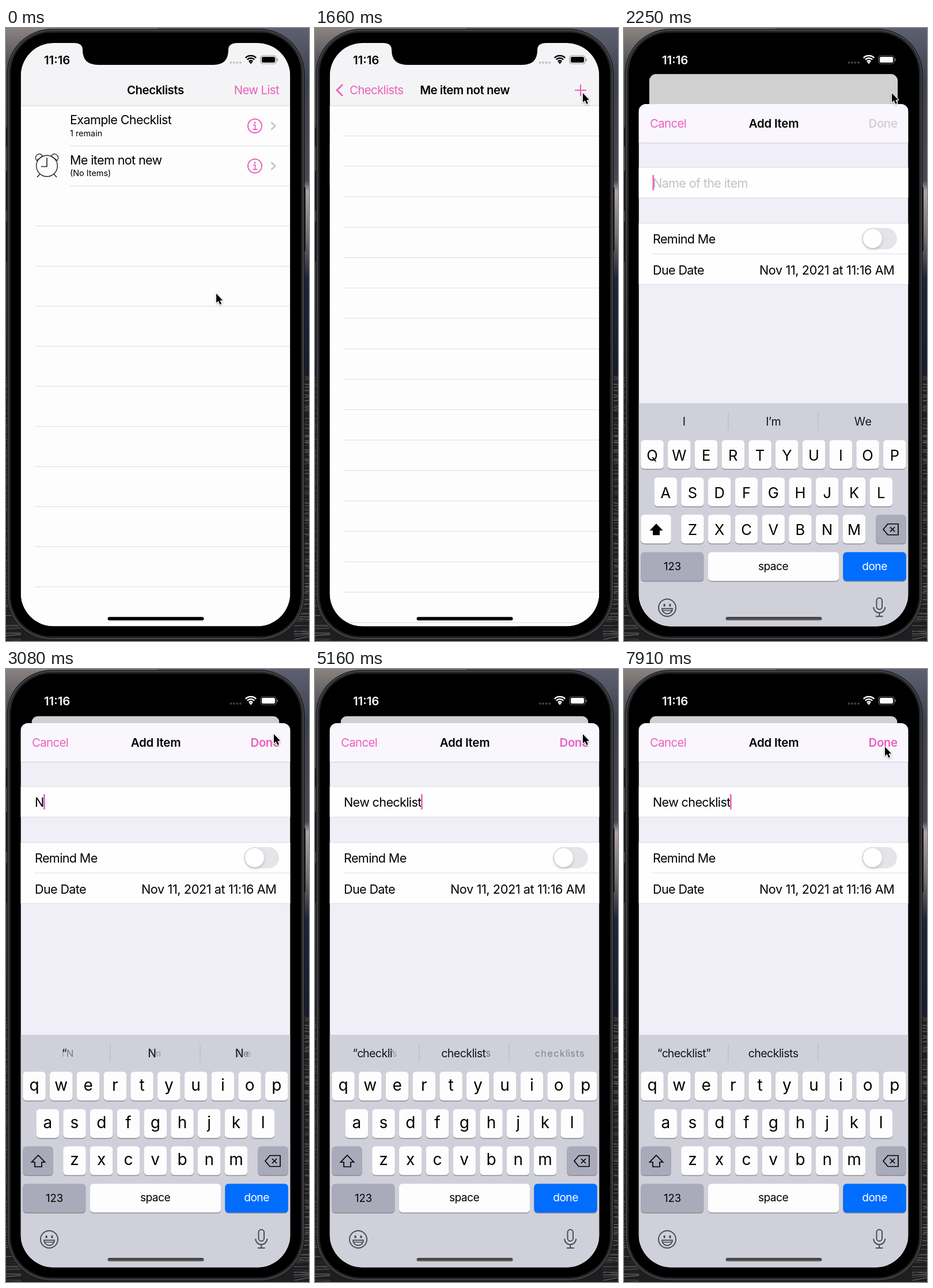
An HTML page with a canvas that plays this animation: 526x1064 px, repeating every 8 s.

```html
<!DOCTYPE html>
<html lang="en">
<head>
<meta charset="utf-8">
<title>Checklists</title>
<style>
html, body { margin: 0; width: 100%; height: 100%; overflow: hidden; background: #111; }
canvas { display: block; width: 526px; height: 1064px; }
</style>
</head>
<body>
<canvas id="stage" width="526" height="1064"></canvas>
<script>
const ctx = document.getElementById('stage').getContext('2d');
const LOOP = 8000, FPS = 12;
const LEFT = 25.5, TOP = 26, W = 468, H = 1012.5, RIGHT = LEFT + W;
const PINK = '#ec60bd', LINE = '#dcdbe0';
const clamp = v => Math.max(0, Math.min(1, v));
const mix = (a, b, k) => a + (b - a) * k;
const gray = (v, a = 1) => `rgba(${v},${v},${v},${a})`;

// Critically damped spring from 0 to 1
function spring(t, start) {
  const u = Math.max(0, t - start) * 0.012;
  return 1 - (1 + u) * Math.exp(-u);
}

function rect(x, y, w, h, color, r = 0) {
  ctx.fillStyle = color;
  ctx.beginPath();
  ctx.roundRect(x, y, w, h, r);
  ctx.fill();
}

function poly(points, color, width, close) {
  ctx.beginPath();
  for (let i = 0; i < points.length; i += 2) ctx.lineTo(points[i], points[i + 1]);
  if (close) ctx.closePath();
  if (width) {
    ctx.strokeStyle = color;
    ctx.lineWidth = width;
    ctx.stroke();
  } else {
    ctx.fillStyle = color;
    ctx.fill();
  }
}

function arc(x, y, r, color, width, from = 0, to = Math.PI * 2) {
  ctx.beginPath();
  ctx.arc(x, y, r, from, to);
  ctx.strokeStyle = color;
  ctx.lineWidth = width;
  ctx.stroke();
}

function setFont(size, weight = 400, tracking = weight > 500 ? -0.022 : -0.03) {
  ctx.font = `${weight} ${size}px Inter, "Liberation Sans", sans-serif`;
  ctx.letterSpacing = size * tracking + 'px';
}

// y is the middle of the capitals
function text(s, x, y, size, color = '#000', align = 'left', weight = 400, tracking) {
  setFont(size, weight, tracking);
  ctx.textAlign = align;
  ctx.fillStyle = color;
  ctx.fillText(s, x, y + size * 0.364);
}

function group(draw, x = 0, y = 0, alpha = 1) {
  ctx.save();
  ctx.translate(x, y);
  ctx.globalAlpha *= alpha;
  draw();
  ctx.restore();
}

function wallpaper() {
  const fill = (x, w, stops) => {
    const g = ctx.createLinearGradient(0, 0, 0, 602);
    stops.forEach(([at, c]) => g.addColorStop(at, c));
    ctx.fillStyle = g;
    ctx.fillRect(x, 0, w, 602);
  };
  fill(0, 263, [[0, '#8a837f'], [0.1, '#55525a'], [0.6, '#46464c'], [1, '#22242c']]);
  fill(263, 263, [[0, '#5c6070'], [0.15, '#3e424f'], [0.44, '#474851'], [0.47, '#aaa3a2'],
    [0.6, '#77706f'], [0.72, '#20263a'], [1, '#181d2c']]);
  rect(0, 602, 526, 462, '#1d1e20');
  let seed = 7;
  const rnd = () => (seed = seed * 16807 % 2147483647) / 2147483647;
  for (let y = 602; y < 1064; y += 3) {
    for (const x of [0, 500]) {
      poly([x, y + rnd() * 4, x + 26, y + rnd() * 8 - 2], gray(Math.round(30 + rnd() * 90)), 1.2);
    }
  }
}

function phone() {
  rect(0, 172, 5, 34, '#17171a', 2);
  rect(0, 248, 5, 70, '#17171a', 2);
  rect(0, 336, 5, 70, '#17171a', 2);
  rect(514, 276, 6, 112, '#17171a', 2);
  rect(1.5, 1.5, 517, 1061, '#19191b', 78);
  rect(3, 3, 514, 1058, '#454548', 76);
  rect(5, 5, 510, 1054, '#242427', 74);
  rect(8, 8, 504, 1048, '#000', 71);
}

function infoIcon(y) {
  arc(432, y, 12, PINK, 2);
  rect(430.3, y - 7.2, 3.4, 3.4, PINK, 1.7);
  poly([429, y - 1.6, 432.6, y - 1.6, 432.6, y + 6], PINK, 1.8);
  poly([428.5, y + 6, 436.3, y + 6], PINK, 1.8);
  poly([460.5, y - 6.5, 467.5, y, 460.5, y + 6.5], '#c2c2c6', 2.4);
}

function alarmIcon() {
  arc(71, 239.5, 18.3, '#222', 1.4);
  poly([71, 225, 71, 240.5, 61, 240.5], '#222', 1.6);
  for (const s of [-1, 1]) {
    ctx.beginPath();
    ctx.moveTo(71 + s * 18, 230);
    ctx.bezierCurveTo(71 + s * 24, 222, 71 + s * 12, 214, 71 + s * 7.5, 222);
    ctx.closePath();
    ctx.lineWidth = 1.3;
    ctx.stroke();
    poly([71 + s * 12, 253.5, 71 + s * 17, 259], '#222', 1.6);
  }
}

function listsPage(pressed) {
  rect(LEFT, 135, W, 904, '#fdfdfe');
  if (pressed) rect(LEFT, 204.5, W, 69.5, '#cfcfd5');
  for (let i = 1; i < 13; i++) {
    const x = i < 3 ? 111 : 50;
    rect(x, 134.6 + i * 69.57, RIGHT - x, 1, LINE);
  }
  text('Example Checklist', 111, 159.5, 21.6);
  text('1 remain', 111, 182.5, 14.4, '#000', 'left', 400, 0);
  text('Me item not new', 111, 229, 21.6);
  text('(No Items)', 111, 252, 14.4, '#000', 'left', 400, 0);
  infoIcon(170);
  infoIcon(239.5);
  alarmIcon();
}

function itemsPage() {
  rect(LEFT, 135, W, 904, '#fdfdfe');
  for (let i = 1; i < 18; i++) rect(50, 134 + i * 52.8, RIGHT - 50, 1, LINE);
}

function navBar(push, modal) {
  const fade = clamp(modal * 1.7);
  const tint = (k, v) => `rgb(${mix(236, v, k)},${mix(96, v, k)},${mix(189, v, k)})`;
  const backTint = tint(modal * 0.7, 165), plusTint = tint(fade, 182);
  const back = mix(210, 60, push);
  rect(LEFT, TOP, W, 109, '#f4f4f6');
  rect(LEFT, 134.5, W, 1, '#d5d5d9');
  group(() => {
    text('New List', 474, 108, 20.4, PINK, 'right');
    text('Checklists', back, 108, 20.4, push ? PINK : '#000', 'left', 600);
  }, 0, 0, 1 - push);
  group(() => {
    text('Checklists', back, 108, 20.4, backTint);
    poly([48, 98, 38, 108, 48, 118], backTint, 2.8);
    poly([451, 108, 471, 108], plusTint, 2);
    poly([461, 98, 461, 118], plusTint, 2);
    text('Me item not new', mix(520, 260, push), 108, 20.4, '#000', 'center', 600);
  }, 0, 0, push);
}

function statusBar(modal) {
  const k = clamp((modal - 0.55) * 2.5);
  const c = gray(Math.round(255 * k));
  text('11:16', 66, 55.5, 20.4, c, 'left', 600, 0);
  for (let i = 0; i < 4; i++) rect(388.5 + i * 5.5, 58, 4, 4, gray(Math.round(mix(196, 62, clamp(modal * 1.3)))), 2);
  for (const r of [4.5, 8.8, 13]) arc(425, 61, r, c, 2.4, -Math.PI * 0.75, -Math.PI * 0.25);
  poly([425, 62.5, 421.5, 58.5, 428.5, 58.5], c, 0, true);
  ctx.globalAlpha = 0.4;
  ctx.lineWidth = 1.2;
  ctx.strokeStyle = c;
  ctx.beginPath();
  ctx.roundRect(442, 48, 27, 14, 4);
  ctx.stroke();
  rect(470, 53, 2, 4.5, c, 1);
  ctx.globalAlpha = 1;
  rect(444, 50, 23, 10, c, 2.2);
}

const KEYS = [[3000, 'N'], [3160, 'e'], [3330, 'w'], [3910, ' '], [4080, 'c'], [4160, 'h'], [4250, 'e'],
  [4410, 'c'], [4490, 'k'], [4750, 'l'], [4830, 'i'], [5000, 's'], [5080, 't']];
const HINTS = [
  [1830, 'I', 'I’m', 'We'],
  [2960, '“N”', 'No', 'New'],
  [3330, '“New”', 'News', 'Newest'],
  [3910, 'York', 'one', 'and'],
  [4080, '“che”', 'Che', 'check'],
  [4410, '“chec”', 'Chec', 'checkin'],
  [4750, '“checkl”', 'checklist', 'checklists'],
  [5080, '“checklist”', 'checklists', '']
];

function sheet(typed, caretOn) {
  rect(LEFT, 94, W, 960, '#f0eff8', [13, 13, 0, 0]);
  rect(LEFT, 94, W, 67, '#f9f7fd', [13, 13, 0, 0]);
  rect(LEFT, 161, W, 1, '#d0cfd5');
  text('Cancel', 45, 128, 20.4, PINK);
  text('Add Item', 260, 128, 20.4, '#000', 'center', 600, -0.012);
  text('Done', 474.5, 128, 20.4, typed ? PINK : '#d2d0d6', 'right', 600);
  rect(LEFT, 203.5, W, 54, LINE);
  rect(LEFT, 204.5, W, 52, '#fefeff');
  rect(LEFT, 300.5, W, 107, LINE);
  rect(LEFT, 301.5, W, 105, '#fefeff');
  rect(50, 353.5, RIGHT - 50, 1, LINE);
  text(typed || 'Name of the item', 50, 231, 21.6, typed ? '#000' : '#c2c2c6');
  const caret = 49.5 + ctx.measureText(typed).width;
  if (caretOn) rect(caret, 217, 2.6, 27, PINK, 1);
  text('Remind Me', 50, 328, 21.6);
  text('Due Date', 50, 382, 21.6);
  text('Nov 11, 2021 at 11:16 AM', 469.5, 382, 21.6, '#000', 'right', 400, -0.017);
  rect(413, 309, 61, 37, '#e5e4e9', 18.5);
  ctx.shadowColor = gray(0, 0.2);
  ctx.shadowBlur = 5;
  ctx.shadowOffsetY = 2;
  rect(415, 311, 33, 33, '#fff', 16.5);
  ctx.shadowColor = 'transparent';
}

// Letters that differ from the previous word grow and fade in one after another
function hint(prev, next, x, k) {
  const width = s => (setFont(19.6), ctx.measureText(s).width);
  const left = mix(x - width(prev || next) / 2, x - width(next) / 2, k);
  let same = 0;
  while (same < next.length && prev[same] === next[same]) same++;
  const letter = (word, i, alpha) =>
    text(word[i], left + width(word.slice(0, i)), 667, mix(14, 19.6, alpha), gray(20, alpha));
  for (let i = same; i < prev.length; i++) letter(prev, i, (1 - k) ** 3);
  for (let i = 0; i < next.length; i++) {
    letter(next, i, i < same ? 1 : clamp(k * (next.length - same + 1) - (i - same)));
  }
}

function key(x, y, w, color) {
  rect(x, y + 1.5, w, 50, '#8d8d95', 6);
  rect(x, y, w, 50, color, 6);
}

function keyboard(t, upper) {
  rect(LEFT, 635, W, 420, '#d0d0da');
  rect(180.5, 651, 1, 31, '#b5b5bd');
  rect(336.5, 651, 1, 31, '#b5b5bd');
  const now = HINTS.findLastIndex(h => t >= h[0]);
  if (now >= 0) {
    const k = clamp((t - HINTS[now][0]) / 340);
    [104, 259, 414].forEach((x, i) => hint(now ? HINTS[now - 1][i + 1] : '', HINTS[now][i + 1], x, k));
  }
  const rows = [['qwertyuiop', 29.3, 699], ['asdfghjkl', 52.5, 764], ['zxcvbnm', 99.2, 828.5]];
  for (const [letters, left, y] of rows) {
    [...letters].forEach((c, i) => {
      const x = left + i * 46.75;
      key(x, y, 39.5, '#fdfdfe');
      if (upper) text(c.toUpperCase(), x + 19.75, y + 26, 25.5, '#000', 'center', 400, 0);
      else text(c, x + 19.75, y + 22.5, 28, '#000', 'center', 400, 0);
    });
  }
  key(29.3, 828.5, 52.5, upper ? '#fdfdfe' : '#a9aaba');
  key(437.3, 828.5, 52.5, '#a9aaba');
  group(() => poly([0, -10, 11.5, 2, 6, 2, 6, 10, -6, 10, -6, 2, -11.5, 2], '#000', upper ? 0 : 1.7, true), 56, 854);
  group(() => {
    poly([-13, 0, -5, -9.5, 13, -9.5, 13, 9.5, -5, 9.5], '#000', 1.7, true);
    poly([-1, -4, 7, 4], '#000', 1.7);
    poly([7, -4, -1, 4], '#000', 1.7);
  }, 463, 854);
  key(29.3, 893.5, 109, '#a9aaba');
  text('123', 84, 918.5, 18.5, '#000', 'center', 400, 0);
  key(146, 893.5, 227, '#fdfdfe');
  text('space', 259, 917.5, 19.2, '#000', 'center');
  key(380.3, 893.5, 109.5, '#006dff');
  text('done', 435, 917.5, 19.2, '#fff', 'center');

  const ink = '#4b4c54';
  arc(75, 990, 15, ink, 2);
  rect(68.5, 983, 3.2, 5, ink, 1.6);
  rect(78.3, 983, 3.2, 5, ink, 1.6);
  ctx.beginPath();
  ctx.arc(75, 991.5, 9, 0, Math.PI);
  ctx.closePath();
  ctx.stroke();
  poly([67, 995, 83, 995], ink, 1.4);
  ctx.lineWidth = 2;
  ctx.beginPath();
  ctx.roundRect(438.5, 973, 9.5, 20, 4.8);
  ctx.stroke();
  arc(443.2, 989, 10, ink, 2, 0, Math.PI);
  poly([443.2, 999, 443.2, 1005], ink, 2);
  poly([437, 1005, 449.5, 1005], ink, 2);
}

function notch() {
  ctx.fillStyle = '#000';
  ctx.fill(new Path2D('M118 20H402V26Q386 26 386 38Q386 64 360 64H160Q133 64 133 38Q133 26 118 26Z'));
}

function homeBar(modal) {
  const k = clamp(modal * 1.7);
  const g = ctx.createLinearGradient(0, 1022, 0, 1029);
  g.addColorStop(0, gray(Math.round(k * 45)));
  g.addColorStop(1, gray(Math.round(k * 115)));
  rect(176.5, 1022.2, 167, 6, g, 3);
}

const MOVES = [[80, 500, 329, 264], [1000, 1500, 465, 113], [5580, 6000, 441, 341], [7250, 7800, 453, 135]];
function pointer(t) {
  let x = 365, y = 461;
  for (const [from, to, toX, toY] of MOVES) {
    const k = clamp((t - from) / (to - from)), e = k * k * (3 - 2 * k);
    x = mix(x, toX, e);
    y = mix(y, toY, e);
  }
  group(() => {
    const shape = [0, 0, 0, 16, 3.6, 12.8, 6.4, 19, 9, 17.8, 6.4, 12, 11, 11.6];
    ctx.lineJoin = 'round';
    ctx.shadowColor = gray(0, 0.35);
    ctx.shadowBlur = 3;
    ctx.shadowOffsetY = 1;
    poly(shape, '#fff', 2.4, true);
    ctx.shadowColor = 'transparent';
    poly(shape, '#000', 0, true);
  }, x, y);
}

function screen(t) {
  const push = spring(t, 583), modal = spring(t, 1833);
  const typedKeys = KEYS.filter(k => t >= k[0]);
  const typed = typedKeys.map(k => k[1]).join('');
  const lastKey = typed ? typedKeys.at(-1)[0] : 1917;
  const caretOn = (t - lastKey) % 900 < 660;

  ctx.save();
  ctx.beginPath();
  ctx.roundRect(LEFT, TOP, W, H, 57);
  ctx.clip();
  rect(LEFT, TOP, W, H, '#000');
  ctx.save();
  const scale = 1 - 0.081 * modal;
  ctx.translate(259.5, TOP + 56 * modal);
  ctx.scale(scale, scale);
  ctx.translate(-259.5, -TOP);
  ctx.beginPath();
  ctx.roundRect(LEFT, TOP, W, H, mix(57, 12, modal));
  ctx.clip();
  group(() => listsPage(t >= 480), -140 * push);
  if (push) {
    rect(LEFT, 135, W, 904, gray(0, 0.11 * push));
    group(itemsPage, W * (1 - push));
  }
  navBar(push, modal);
  rect(LEFT, TOP, W, H, gray(0, 0.15 * modal));
  ctx.restore();
  if (modal) {
    group(() => sheet(typed, caretOn), 0, 944 * (1 - modal));
    group(() => keyboard(t, !typed), 0, 403 * (1 - modal));
  }
  statusBar(modal);
  ctx.restore();
  notch();
  homeBar(modal);
}

let shown = -1;
function tick(ms) {
  const step = Math.floor((ms % LOOP + 10) * FPS / 1000) % (LOOP * FPS / 1000);
  if (step !== shown) {
    shown = step;
    const t = step * 1000 / FPS;
    wallpaper();
    phone();
    screen(t);
    pointer(t);
  }
  requestAnimationFrame(tick);
}
tick(0);
</script>
</body>
</html>
```
